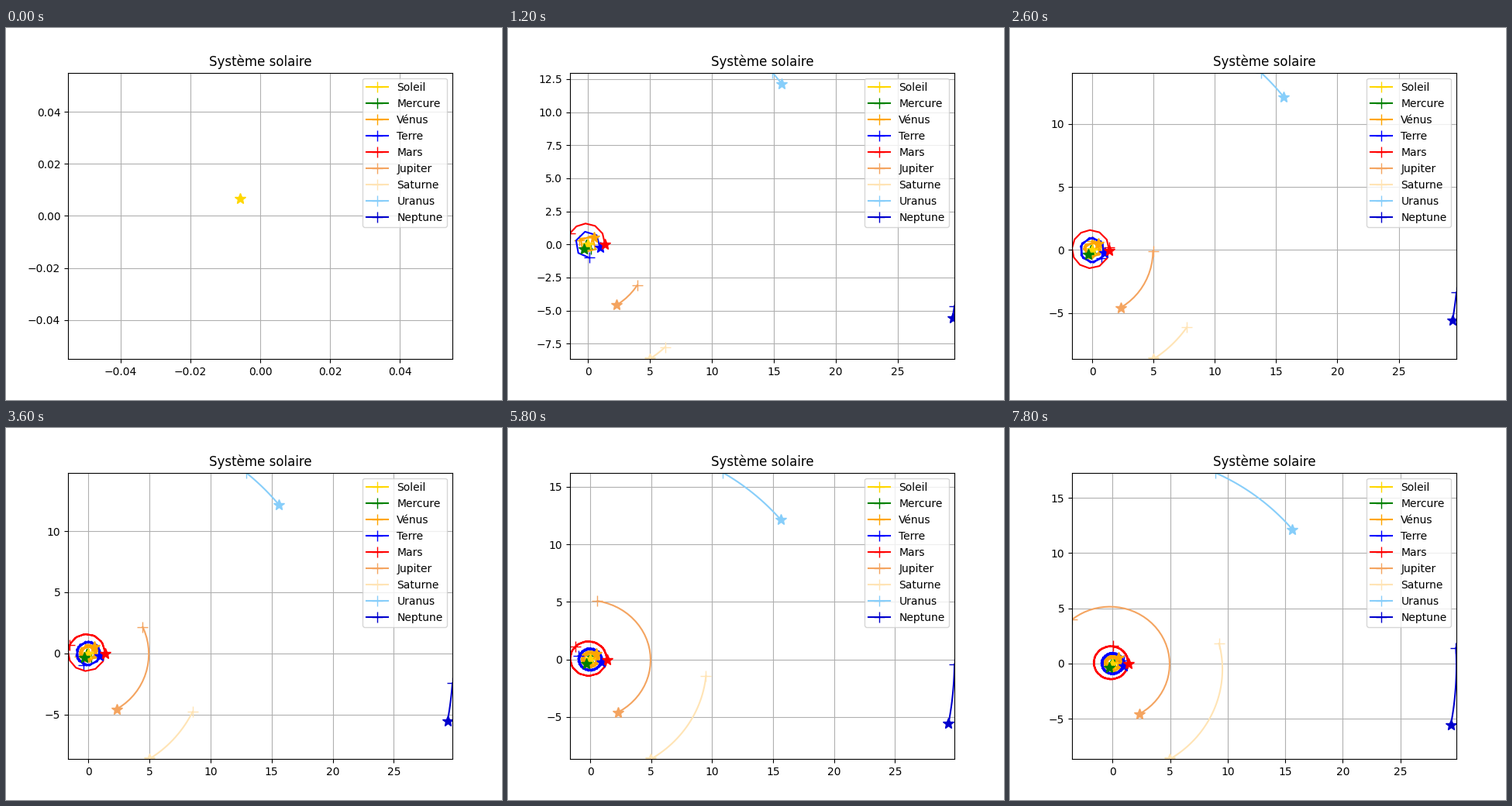
Recreate the animation shown at these times as a matplotlib script. Size 640 px wide and 480 px high, loop 8 s.

```python
import numpy as np
import matplotlib.pyplot as plt
from matplotlib.animation import FuncAnimation

FRAMES, INTERVAL = 40, 200
YEARS = 0.16 * np.arange(FRAMES)
CENTRE = np.array([[-0.0057], [0.0066]])   # Sun seen from the barycentre


def orbit(a, e, peri, lon):
    """Kepler ellipse: axis (AU), eccentricity, perihelion and mean longitude."""
    mean = 2 * np.pi * YEARS / a ** 1.5 + np.radians(lon - peri)
    ecc = mean
    for _ in range(12):
        ecc = mean + e * np.sin(ecc)
    z = a * (np.cos(ecc) - e + 1j * np.sqrt(1 - e * e) * np.sin(ecc))
    z = z * np.exp(1j * np.radians(peri))
    return CENTRE + [z.real, z.imag]


BODIES = [
    ("Soleil", "gold", orbit(1, 0, 0, 0) * 0 + CENTRE),
    ("Mercure", "green", orbit(0.3871, 0.2056, 77.5, 216.0)),
    ("Vénus", "orange", orbit(0.7233, 0.0068, 131.6, 48.5)),
    ("Terre", "blue", orbit(1.0, 0.0167, 102.9, 348.2)),
    ("Mars", "red", orbit(1.5237, 0.0934, -23.9, 355.3)),
    ("Jupiter", "sandybrown", orbit(5.203, 0.0484, 14.7, 302.2)),
    ("Saturne", "moccasin", orbit(9.537, 0.0555, 92.6, 302.96)),
    ("Uranus", "lightskyblue", orbit(19.19, 0.0473, 171.0, 41.9)),
    ("Neptune", "mediumblue", orbit(30.07, 0.0086, 45.0, 350.1)),
]
paths = np.array([path for _, _, path in BODIES])   # body, axis, time

fig, ax = plt.subplots(figsize=(6.4, 4.8), dpi=100)
ax.set_title("Système solaire")
ax.grid()

trails = []
for name, color, (x, y) in BODIES:
    trails += ax.plot([], [], color=color, marker="+", markersize=10,
                      markevery=slice(-1, None), label=name)
    ax.plot(x[:1], y[:1], "*", color=color, markersize=10, zorder=2.2)
ax.legend(loc="upper right")


def update(i):
    for trail, path in zip(trails, paths):
        trail.set_data(path[:, :i])
    if i == 0:
        ax.set(xlim=(-0.055, 0.055), ylim=(-0.055, 0.055))
    else:
        x, y = paths[:, 0, :i], paths[:, 1, :i]
        ax.set(xlim=(x.min(), x.max()), ylim=(y.min(), y.max()))
    return trails


anim = FuncAnimation(fig, update, frames=FRAMES, interval=INTERVAL,
                     init_func=lambda: update(0), repeat=True, repeat_delay=0)
plt.show()
```
